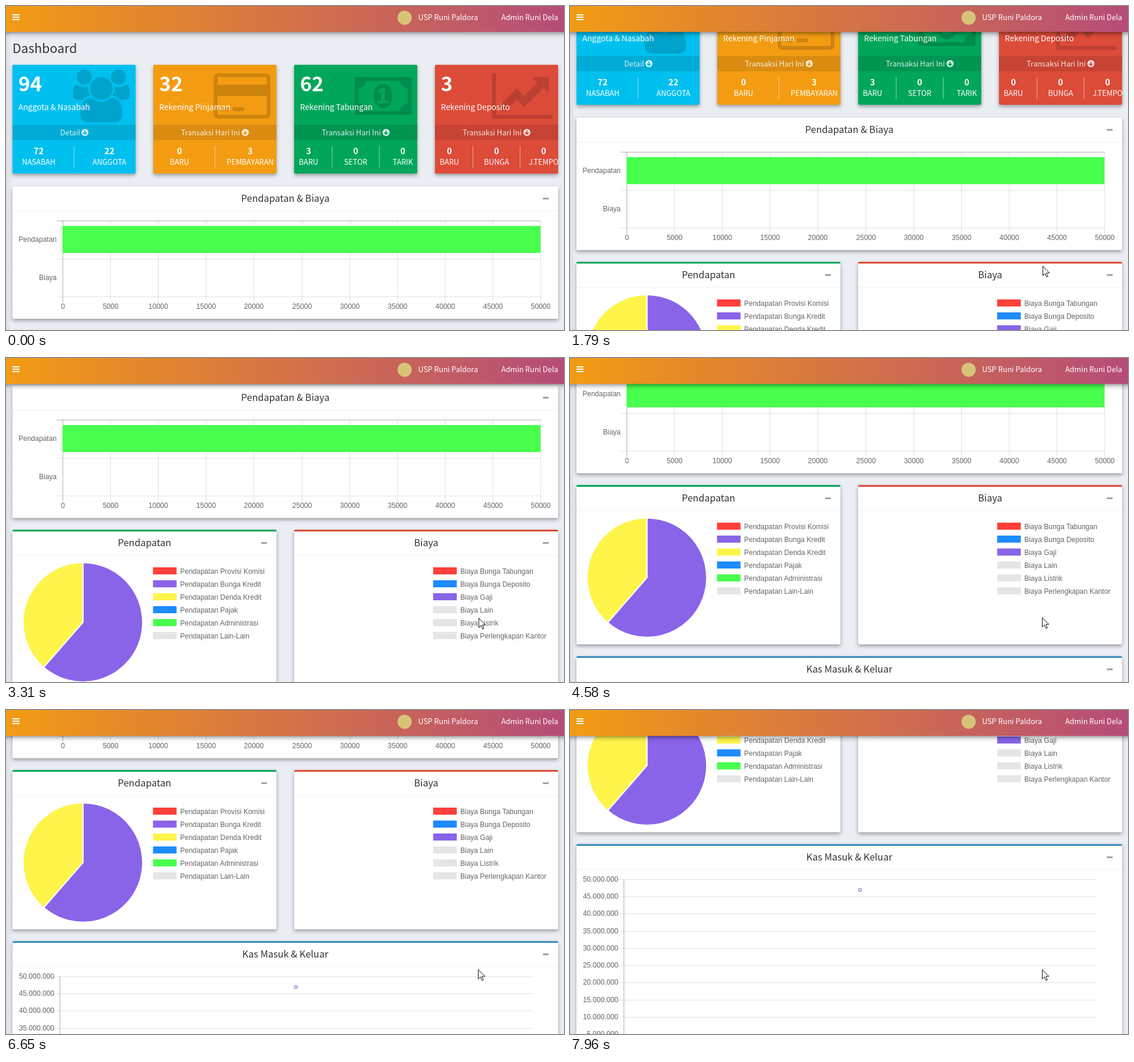
Animation, 947 px wide and 551 px high, one loop 8000 ms. Source, as an HTML page:

```html
<!DOCTYPE html>
<html lang="id">
<head>
<meta charset="utf-8">
<title>Dashboard</title>
<style>
html, body { margin: 0; width: 100%; height: 100%; overflow: hidden; background: #eaeef3; }
svg { display: block; width: 947px; height: 551px; }
text { font: 12.54px "Noto Sans CJK JP", "Noto Sans CJK SC", "Noto Sans CJK", "Noto Sans", sans-serif; fill: #fff; white-space: pre; }
.page { font-size: 21.5px; fill: #333; }
.title { font-size: 16.1px; fill: #333; }
.count { font-size: 34px; font-weight: 700; }
.name { font-size: 13.43px; }
.foot { fill: #fff; opacity: .85; }
.num { font-size: 14.3px; font-weight: 700; }
.nav { font-weight: 500; }
.tick { font: 12px "Liberation Sans", Arial, sans-serif; fill: #666; }
.mid { text-anchor: middle; }
.end { text-anchor: end; }
.card { filter: drop-shadow(0 3px 3px rgba(0, 0, 0, .35)); }
.bar { filter: drop-shadow(0 2px 4px rgba(0, 0, 0, .5)); }
.grid rect { shape-rendering: crispEdges; }
</style>
</head>
<body>
<svg viewBox="0 0 947 551">
  <defs>
    <linearGradient id="nav"><stop stop-color="#f39c12"/><stop offset="1" stop-color="#b54b7a"/></linearGradient>
    <linearGradient id="edge"><stop stop-color="#000" stop-opacity=".07"/><stop offset="1" stop-color="#000" stop-opacity="0"/></linearGradient>
  </defs>
  <rect width="947" height="551" fill="#eaeef3"/>
  <rect width="9" height="551" fill="url(#edge)"/>
  <g id="content"></g>
  <rect class="bar" x="-10" y="-10" width="967" height="54" fill="url(#nav)"/>
  <path d="M11 15h12M11 19h12M11 23h12" stroke="#fff" stroke-width="2"/>
  <circle cx="676.5" cy="20" r="12" fill="#d8c27a"/>
  <text class="nav" x="699.5" y="24">USP Runi Paldora</text>
  <text class="nav end" x="937" y="24">Admin Runi Dela</text>
  <path id="cursor" d="M.5.5v16l3.7-3.6 2.6 6 2.4-1-2.6-5.9h5.1z" fill="#fff" stroke="#111"/>
</svg>
<script>
const RED = '#ff403a', BLUE = '#1e8bff', VIOLET = '#8964e8', YELLOW = '#fff44a', GREEN = '#48ff4d', GRAY = '#e5e5e5';
const LINE = 'rgba(0,0,0,.11)', AXIS = 'rgba(0,0,0,.3)';

const rect = (x, y, w, h, fill, extra = '') =>
  `<rect x="${x}" y="${y}" width="${w}" height="${h}" fill="${fill}" ${extra}/>`;
const text = (x, y, s, cls = '') =>
  `<text x="${x}" y="${y}" class="${cls}">${s.replace('&', '&amp;')}</text>`;

const sidePerson = '<circle cx="384" cy="256" r="256"/><path d="M593 896q-162 5-265 128H194q-82 0-138-40T0 865Q0 512 124 512C140 512 250 597 384 597q67 0 133-23-5 37-5 66 0 139 81 256z"/>';
const icons = {
  users: sidePerson + `<g transform="translate(1920) scale(-1 1)">${sidePerson}</g>` +
    '<circle cx="960" cy="640" r="384"/><path d="M602 960C660 960 760 1100 960 1100S1260 960 1318 960C1560 960 1664 1200 1664 1533C1664 1690 1560 1792 1397 1792H523C360 1792 256 1690 256 1533C256 1200 360 960 602 960z"/>',
  card: '<path fill-rule="evenodd" d="M160 128H1760q160 0 160 160V1504q0 160-160 160H160q-160 0-160-160V288q0-160 160-160zM160 256q-32 0-32 32V512H1792V288q0-32-32-32zM128 896v608q0 32 32 32H1760q32 0 32-32V896z"/><path d="M256 1280h256v128H256zM640 1280h384v128H640z"/>',
  money: '<path fill-rule="evenodd" d="M64 256H1856q64 0 64 64V1472q0 64-64 64H64q-64 0-64-64V320q0-64 64-64zM384 384a256 256 0 0 1-256 256v512a256 256 0 0 1 256 256H1536a256 256 0 0 1 256-256V640a256 256 0 0 1-256-256z"/><path fill-rule="evenodd" d="M960 480a320 416 0 0 1 0 832a320 416 0 0 1 0-832zM768 1152h384v-96h-128V608H910L762 745l77 80q42-37 55-57h2v288H768z"/>',
  chart: '<path d="M0 128h128v1408h1920v128H0zM1888 256q32 0 32 32v435q0 21-19 29t-36-8l-121-121-656 656-256-256-416 416-192-192 608-608 256 256 441-441-121-121q-16-16-8-36 8-41 29-41z"/>'
};

function card(x, color, icon, iconX, count, name, foot, stats) {
  const w = 209, n = stats.length, footX = foot === 'Detail' ? 81 : 47;
  const arrowX = foot === 'Detail' ? x + 123 : x + 156;
  let s = rect(x, 100, w, 185, color, 'rx="2" class="card"');
  s += `<g opacity=".15" transform="translate(${x + iconX} 108) scale(.0502)">${icons[icon]}</g>`;
  s += rect(x, 202, w, 26, 'rgba(0,0,0,.1)');
  s += text(x + 10, 145, count, 'count') + text(x + 10, 177, name, 'name') + text(x + footX, 220, foot, 'foot');
  s += `<circle cx="${arrowX}" cy="215" r="6" fill="#fff" opacity=".88"/>`;
  s += `<path d="M${arrowX} 211.3v6.5m-3.2-2.8l3.2 3.2 3.2-3.2" fill="none" stroke="${color}" stroke-width="1.8"/>`;
  const step = n === 2 ? 120 : 80, first = n === 2 ? 44.5 : 24.5;
  stats.forEach(([value, label], i) => {
    const cx = x + first + i * step;
    s += text(cx, 252, value, 'num mid') + text(cx, 270, label, 'mid');
    if (i) s += rect(Math.floor(cx - step / 2), 238, 1, 37, 'rgba(255,255,255,.5)');
  });
  return s;
}

function box(x, y, w, h, title, color) {
  let s = rect(x, y, w, h, '#fff', 'rx="2" class="card"');
  if (color) s += `<path d="M${x} ${y + 3}v-1q0-2 2-2h${w - 4}q2 0 2 2v1z" fill="${color}"/>`;
  const top = color ? y + 22 : y + 20;
  return s + rect(x, top + 21, w, 1, '#f2f2f2') + text(x + w / 2, top + 6, title, 'title mid') +
    rect(x + w - 26, top - 1, 10, 3, '#a0a3b0', 'rx="1"');
}

function barChart() {
  let s = '';
  for (let i = 0; i <= 10; i++) {
    const x = Math.round(96 + i * 81.1);
    s += rect(x, 365, 1, 139, i ? LINE : AXIS) + text(x + .5, 515, String(i * 5000), 'tick mid');
  }
  s += rect(86, 365, 822, 1, AXIS) + rect(86, 430, 822, 1, LINE) + rect(86, 494, 822, 1, LINE);
  return s + rect(96, 374, 811, 46, GREEN) + text(86, 401, 'Pendapatan', 'tick end') + text(86, 466, 'Biaya', 'tick end');
}

function pie(cx, cy, r, deg) {
  const a = deg * Math.PI / 180, x = cx + r * Math.sin(a), y = cy - r * Math.cos(a);
  const slice = (from, arc, to, fill) =>
    `<path d="M${cx} ${cy}L${from}A${r} ${r} 0 ${arc} 1 ${to}z" fill="${fill}" stroke="#fff" stroke-width="2"/>`;
  const top = `${cx} ${cy - r}`, cut = `${x} ${y}`;
  return slice(top, 1, cut, VIOLET) + slice(cut, 0, top, YELLOW);
}

const legend = (x, prefix, rows) => rows.map(([label, color], i) =>
  rect(x, 616 + i * 22, 40, 12, color) + text(x + 46, 627 + i * 22, prefix + ' ' + label, 'tick')).join('');

function cashChart() {
  let s = rect(91, 903, 1, 302, AXIS);
  for (let i = 0; i <= 10; i++) {
    const y = Math.round(903 + i * 29.23), value = 50 - i * 5;
    s += rect(82, y, 812, 1, LINE) + text(82, y + 4, value ? value + '.000.000' : '0', 'tick end');
  }
  return s + '<circle cx="492" cy="921" r="3" fill="#d9d2f4" stroke="#9384d2"/>';
}

const content = document.getElementById('content'), cursor = document.getElementById('cursor');
const day = 'Transaksi Hari Ini';
content.innerHTML = text(11, 80, 'Dashboard', 'page') +
  card(11, '#00c0ef', 'users', 102.6, '94', 'Anggota & Nasabah', 'Detail', [['72', 'NASABAH'], ['22', 'ANGGOTA']]) +
  card(250, '#f39c12', 'card', 102.5, '32', 'Rekening Pinjaman', day, [['0', 'BARU'], ['3', 'PEMBAYARAN']]) +
  card(489, '#00a65a', 'money', 102.8, '62', 'Rekening Tabungan', day, [['3', 'BARU'], ['0', 'SETOR'], ['0', 'TARIK']]) +
  card(728, '#dd4b39', 'chart', 97, '3', 'Rekening Deposito', day, [['0', 'BARU'], ['0', 'BUNGA'], ['0', 'J.TEMPO']]) +
  box(11, 307, 926, 225, 'Pendapatan & Biaya') +
  box(11, 552, 448, 271, 'Pendapatan', '#00a65a') +
  box(489, 552, 448, 271, 'Biaya', '#dd4b39') +
  box(11, 843, 926, 420, 'Kas Masuk & Keluar', '#3c8dbc') +
  '<g class="grid">' + barChart() + cashChart() + '</g>' +
  pie(130.5, 709.5, 101.5, 221) +
  legend(249.5, 'Pendapatan', [['Provisi Komisi', RED], ['Bunga Kredit', VIOLET], ['Denda Kredit', YELLOW],
    ['Pajak', BLUE], ['Administrasi', GREEN], ['Lain-Lain', GRAY]]) +
  legend(725, 'Biaya', [['Bunga Tabungan', RED], ['Bunga Deposito', BLUE], ['Gaji', VIOLET],
    ['Lain', GRAY], ['Listrik', GRAY], ['Perlengkapan Kantor', GRAY]]);

// [time in ms, scroll offset]
const scrollKeys = [[0, 0], [1480, 0], [1790, 117], [1838, 117], [2080, 157], [2260, 172], [3310, 260], [3358, 260],
  [4150, 310], [4300, 310], [4580, 336], [4628, 336], [4990, 372], [5170, 372], [5450, 400], [5548, 400],
  [6650, 450], [6708, 450], [7960, 615], [8000, 615]];

function scrollAt(t) {
  const i = scrollKeys.findIndex(k => k[0] > t);
  const [t0, y0] = scrollKeys[i - 1], [t1, y1] = scrollKeys[i];
  return Math.round(y0 + (y1 - y0) * (t - t0) / (t1 - t0));
}

function draw(now) {
  const t = now % 8000;
  content.setAttribute('transform', `translate(0 ${-scrollAt(t)})`);
  const u = Math.min(5, Math.max(0, Math.floor((t - 380) / 46))) / 5, rest = (1 - u) ** 2;
  const nudge = t >= 4300 ? 1 : 0;
  cursor.setAttribute('visibility', t < 380 ? 'hidden' : 'visible');
  cursor.setAttribute('transform', `translate(${Math.round(802 + 37 * rest) - nudge} ${Math.round(442 + 98 * rest) - nudge})`);
}

const start = performance.now();
function loop() {
  draw(performance.now() - start);
  requestAnimationFrame(loop);
}
loop();
</script>
</body>
</html>
```
